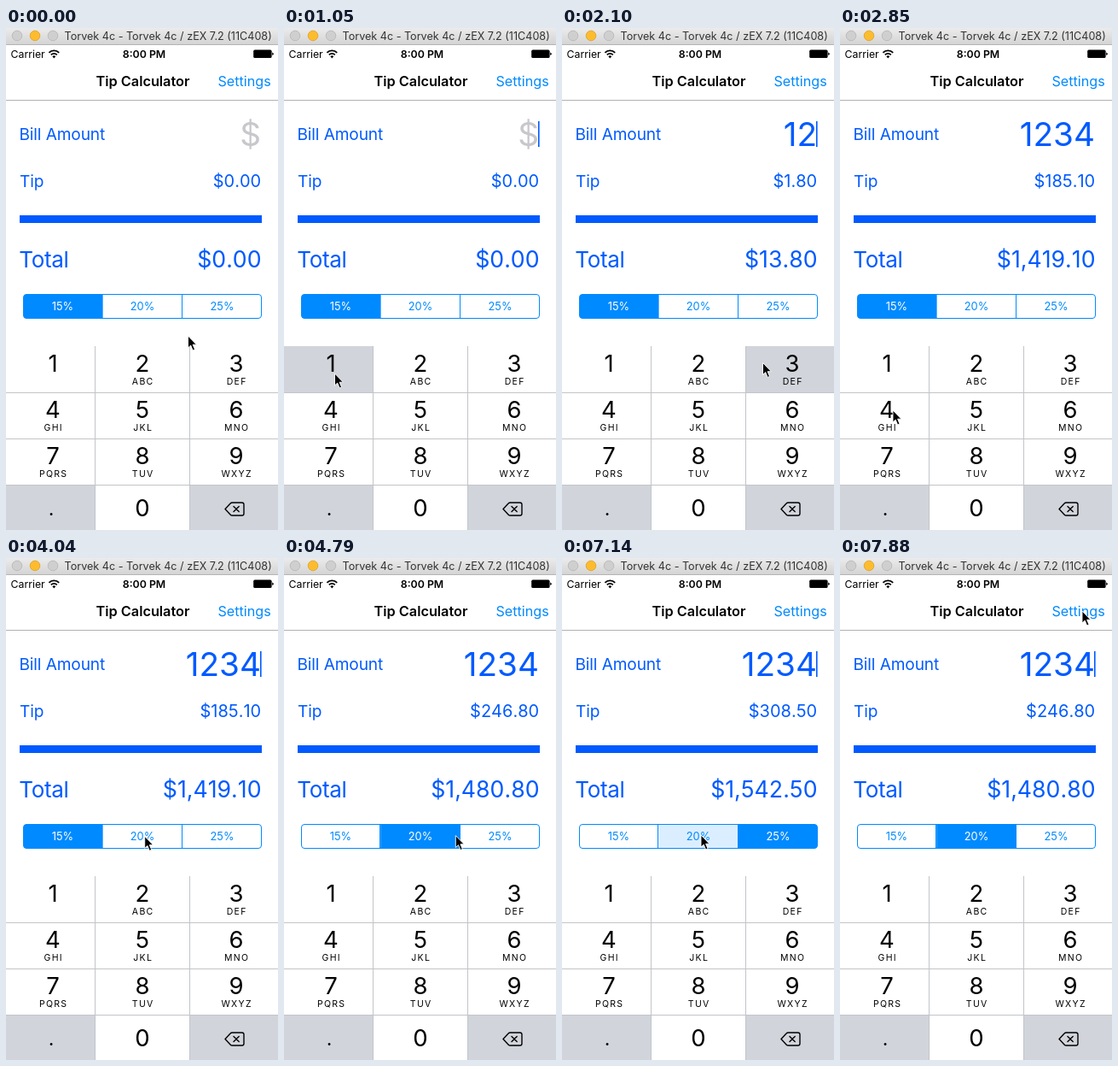
Write an HTML page that moves like this. It is 319 px wide and 587 px high and loops after 8000 ms.

```html
<!DOCTYPE html>
<html lang="en">
<head>
<meta charset="utf-8">
<title>Tip Calculator</title>
<style>
  html, body { margin: 0; width: 100%; height: 100%; overflow: hidden; background: #fff; }
  svg { display: block; width: 100%; height: 100%; }
  text { font-family: Inter, Roboto, sans-serif; }
  .mid { text-anchor: middle; }
  .blue { fill: #005aff; }
  .label { font-size: 19.1px; letter-spacing: -.1px; }
  .amount { text-anchor: end; font-kerning: none; }
  .digit { font-size: 27.5px; }
  .letters { font-size: 10.5px; letter-spacing: 1.3px; }
  .seg { font-size: 12.8px; }
</style>
</head>
<body>
<svg viewBox="0 0 319 587">
  <defs>
    <linearGradient id="chrome" x2="0" y2="1">
      <stop stop-color="#ebebeb"/><stop offset="1" stop-color="#d3d3d3"/>
    </linearGradient>
    <clipPath id="pill"><rect x="20.5" y="311.5" width="279" height="28" rx="3.5"/></clipPath>
  </defs>
  <rect width="319" height="587" fill="#fff"/>

  <!-- window bar -->
  <rect width="319" height="20" fill="url(#chrome)"/>
  <path d="M0 19.5H319" stroke="#b4b4b4"/>
  <g stroke-width=".8">
    <circle cx="13" cy="9" r="5.8" fill="#cfcfcf" stroke="#b5b5b5"/>
    <circle cx="34" cy="9" r="5.8" fill="#fdbc2e" stroke="#dfa023"/>
    <circle cx="55" cy="9" r="5.8" fill="#cfcfcf" stroke="#b5b5b5"/>
  </g>
  <text x="68.5" y="13.8" font-size="12.6" fill="#333">Torvek 4c - Torvek 4c / zEX 7.2 (11C408)</text>

  <!-- status bar -->
  <text x="5.5" y="34.6" font-size="12.3">Carrier</text>
  <path d="M50.4 28.9a8 8 0 0 1 11.8 0M52.8 31.4a4.9 4.9 0 0 1 7 0" fill="none" stroke="#000" stroke-width="1.8"/>
  <path d="M56.3 35.4l-1.9-2.1a2.6 2.6 0 0 1 3.8 0z"/>
  <text class="mid" x="162" y="34.7" font-size="12.3" font-weight="600">8:00 PM</text>
  <rect x="290.2" y="25.6" width="21.4" height="9.4" rx="1.6"/>
  <path d="M312.2 28.6q1.6 .4 1.6 1.7t-1.6 1.7z"/>

  <!-- navigation bar -->
  <text class="mid" x="160.5" y="68" font-size="16.3" font-weight="600">Tip Calculator</text>
  <text x="248.4" y="68" font-size="16.2" fill="#008aff">Settings</text>
  <path d="M0 84.5H319" stroke="#b2b2b2"/>

  <!-- amounts -->
  <g class="blue">
    <text class="label" x="15.4" y="131">Bill Amount</text>
    <text class="label" x="16" y="186">Tip</text>
    <rect x="16" y="219" width="284" height="9"/>
    <text x="15.2" y="280" font-size="26" letter-spacing="-.3">Total</text>
    <text id="bill" class="amount" x="299" y="137.7" font-size="38.7"></text>
    <text id="tip" class="amount" x="299.2" y="185.5" font-size="20"></text>
    <text id="total" class="amount" x="299.5" y="280" font-size="26.7"></text>
    <rect id="caret" x="298" y="109" width="1.6" height="30"/>
  </g>

  <g id="segments" clip-path="url(#pill)"></g>
  <path d="M112.5 311.5v28M206.5 311.5v28" stroke="#008aff"/>
  <rect x="20.5" y="311.5" width="279" height="28" rx="3.5" fill="none" stroke="#008aff"/>
  <g id="rates"></g>

  <g id="keys"></g>
  <path d="M104.5 372V587M215.5 372V587M0 426.5H319M0 480.5H319M0 534.5H319" stroke="#c3c4c9"/>
  <g id="caps"></g>
  <g fill="none" stroke="#000" stroke-width="1.4" stroke-linejoin="round" stroke-linecap="round">
    <path d="M257 562.5L263.3 555.8Q264 555 265.2 555H276.8Q279 555 279 557.2V567.8Q279 570 276.8 570H265.2Q264 570 263.3 569.2Z"/>
    <path d="M267 559.4l6.2 6.2M273.2 559.4l-6.2 6.2"/>
  </g>

  <path id="cursor" d="M0 0V14L3.2 11.1L5.6 16.9L8 15.9L5.6 10.2H9.9Z" stroke="#fff" stroke-width=".9"/>
</svg>
<script>
const LOOP = 8000, STEP = 150;
const TINT = '#008aff', GREY = '#d1d4db';
const $ = id => document.getElementById(id);

function add(parent, tag, attrs, text = '') {
  const el = document.createElementNS('http://www.w3.org/2000/svg', tag);
  for (const k in attrs) el.setAttribute(k, attrs[k]);
  el.textContent = text;
  return $(parent).appendChild(el);
}

// Keypad
const letters = ['', 'ABC', 'DEF', 'GHI', 'JKL', 'MNO', 'PQRS', 'TUV', 'WXYZ'];
const edges = [0, 105, 216, 319];
const keys = [];
for (let i = 0; i < 12; i++) {
  const col = i % 3, top = 372 + 54 * Math.floor(i / 3), mid = 55 + 107.5 * col - (col === 1 ? 2.5 : 0);
  keys.push(add('keys', 'rect', {
    x: edges[col], y: top, width: edges[col + 1] - edges[col], height: 54,
    fill: i === 9 || i === 11 ? GREY : '#fff'
  }));
  if (i > 8) continue;
  add('caps', 'text', { class: 'mid digit', x: mid, y: top + 30 }, i + 1);
  add('caps', 'text', { class: 'mid letters', x: mid + .7, y: top + 45 }, letters[i]);
}
add('caps', 'text', { class: 'mid digit', x: 160, y: 571 }, '0');
add('caps', 'text', { class: 'mid', x: 53, y: 570, 'font-size': 23 }, '.');

// Segmented control
const rates = [15, 20, 25];
const segs = rates.map((rate, i) => ({
  box: add('segments', 'rect', { x: 20 + 93.2 * i, y: 311, width: 93.6, height: 29, fill: TINT }),
  text: add('rates', 'text', { class: 'mid seg', x: 66.5 + 93.5 * i, y: 330 }, rate + '%')
}));

// Where the pointer rests, and what it taps there
const stops = [
  { down: 0, up: 150, x: 213.5, y: 360 },
  { down: 1050, up: 1200, x: 59.5, y: 404, key: 1 },
  { down: 1650, up: 1800, x: 165, y: 403, key: 2 },
  { down: 2100, up: 2250, x: 235.5, y: 391.5, key: 3 },
  { down: 2700, up: 2850, x: 62, y: 447, key: 4 },
  { down: 4340, up: 4640, x: 165.5, y: 322, seg: 1 },
  { down: 5520, up: 5820, x: 250.5, y: 328, seg: 2 },
  { down: 7140, up: 7440, x: 163, y: 324, seg: 1 },
  { down: 7880, up: LOOP, x: 284, y: 62 }
];

const easeOut = k => 1 - (1 - k) ** 3;
const money = n => '$' + n.toLocaleString('en-US', { minimumFractionDigits: 2, maximumFractionDigits: 2 });

function pointer(t) {
  const i = stops.findIndex(s => t < s.up), to = stops[i], from = stops[i - 1];
  if (t >= to.down) return [to.x, to.y];
  const span = to.down - from.up, n = Math.round(span / STEP);
  const k = easeOut(Math.floor((t - from.up) / span * n) / n);
  return [from.x + (to.x - from.x) * k, from.y + (to.y - from.y) * k];
}

function draw(t) {
  let digits = '', rate = rates[0], chosen = 0, held = -1, fade = 0;
  for (const { down, up, key, seg } of stops) {
    if (key) {
      if (t >= up) digits += key;
      keys[key - 1].setAttribute('fill', t >= down && t < up ? GREY : '#fff');
    } else if (seg && t >= down) {
      if (t >= down + STEP) rate = rates[seg];
      if (t >= up) chosen = seg;
      else { held = seg; fade = Math.floor((t - down) / STEP) / 2; }
    }
  }

  segs.forEach((s, i) => {
    s.box.setAttribute('opacity', i === chosen ? 1 : i === held ? .14 + .13 * fade : 0);
    s.text.setAttribute('fill', i === chosen ? '#fff' : TINT);
    s.text.setAttribute('opacity', i === held ? 1 - .7 * fade : 1);
  });

  const amount = Number(digits), tip = amount * rate / 100;
  $('bill').textContent = digits || '$';
  $('bill').style.fill = digits ? '' : '#c7c7cc';
  $('tip').textContent = money(tip);
  $('total').textContent = money(amount + tip);
  $('caret').setAttribute('opacity', (t + 910) % 970 < 500 ? 1 : 0);
  $('cursor').setAttribute('transform', `translate(${pointer(t)})`);
}

const start = performance.now();
function frame() {
  draw((performance.now() - start) % LOOP);
  requestAnimationFrame(frame);
}
frame();
</script>
</body>
</html>
```
